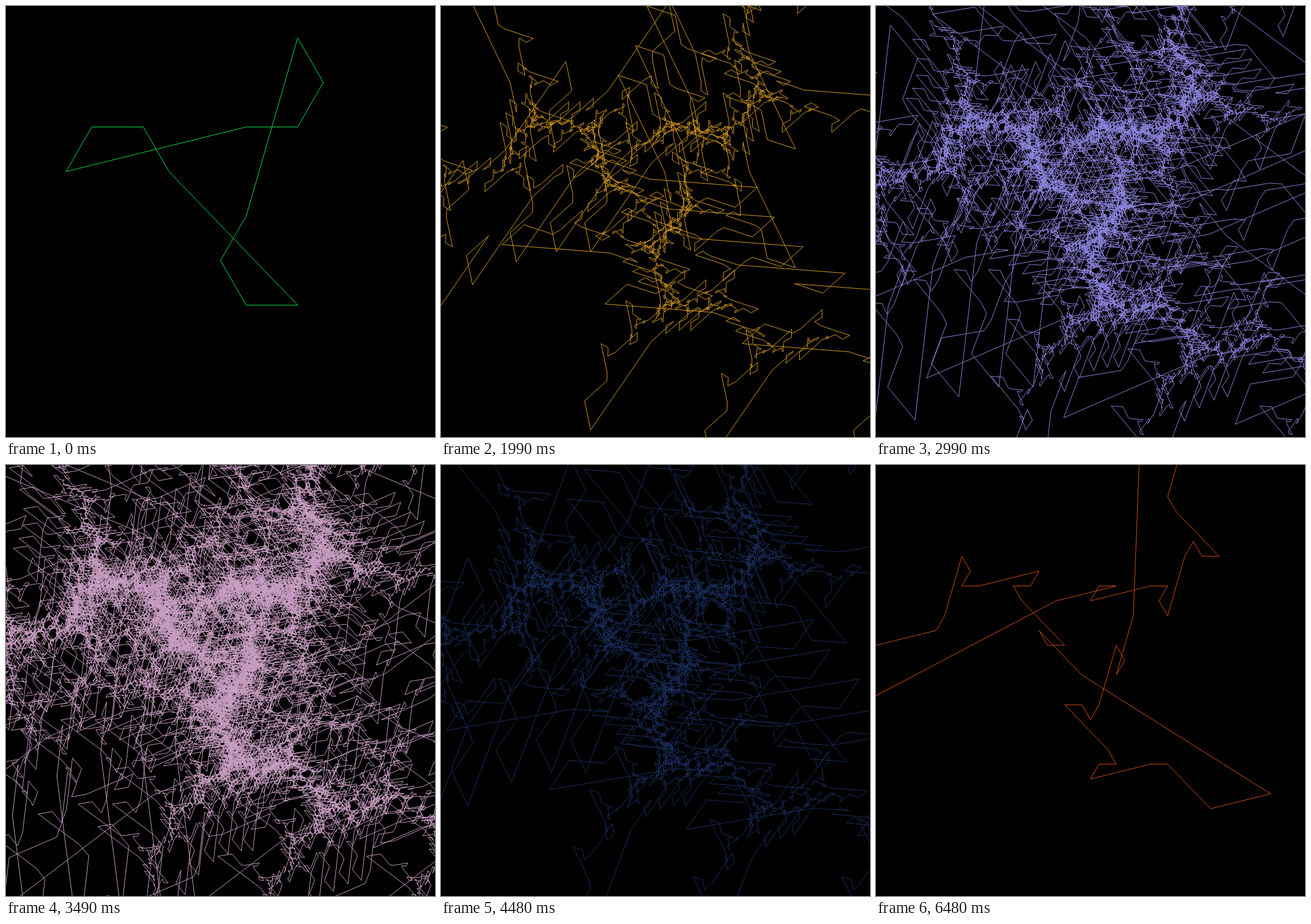
Animation of 746 by 750 pixels, one loop 6.98 s. Source, as an HTML page with a canvas:

```html
<!DOCTYPE html>
<html lang="en">
<head>
<meta charset="utf-8">
<title>Skewed snowflake</title>
<style>
  html, body { margin: 0; width: 100%; height: 100%; overflow: hidden; background: #000; }
  canvas { display: block; }
</style>
</head>
<body>
<canvas id="stage" width="746" height="750"></canvas>
<script>
const W = 746, H = 750, LOOP = 6980;
const CENTER = [372.9, 288], RADIUS = 155;
const COS = 0.5, SIN = Math.sqrt(3) / 2;
const CHUNK = 2048;

// start in ms, recursion level, line colour
const STEPS = [
  [0, 1, '#00ea50'],
  [490, 2, '#2fb4d6'],
  [990, 3, '#c8d23c'],
  [1490, 4, '#d0488c'],
  [1990, 5, '#dc9f1e'],
  [2490, 6, '#4fae78'],
  [2990, 7, '#9085e0'],
  [3490, 8, '#c99fc3'],
  [3980, 7, '#7a8c9c'],
  [4480, 6, '#1b2f60'],
  [4980, 5, '#7c5cc0'],
  [5480, 4, '#dc17a4'],
  [5980, 3, '#58a848'],
  [6480, 2, '#dc500a']
];

function triangle() {
  const pts = [];
  for (const deg of [-30, 210, 90, -30]) {
    const a = deg * Math.PI / 180;
    pts.push(CENTER[0] + RADIUS * Math.cos(a), CENTER[1] + RADIUS * Math.sin(a));
  }
  return pts;
}

// Koch-like rule whose second corner overshoots the end of the edge
function refine(pts) {
  const edges = pts.length / 2 - 1;
  const out = new Float64Array((edges * 4 + 1) * 2);
  let n = 0;
  const add = (x, y) => { out[n++] = x; out[n++] = y; };
  for (let i = 0; i < edges; i++) {
    const ax = pts[2 * i], ay = pts[2 * i + 1];
    const bx = pts[2 * i + 2], by = pts[2 * i + 3];
    const dx = (bx - ax) / 3, dy = (by - ay) / 3;
    add(ax, ay);
    add(ax + dx, ay + dy);
    add(bx + dx + dx * COS + dy * SIN, by + dy - dx * SIN + dy * COS);
    add(bx + dx, by + dy);
  }
  add(pts[pts.length - 2], pts[pts.length - 1]);
  return out;
}

function render(pts, color) {
  const layer = document.createElement('canvas');
  layer.width = W;
  layer.height = H;
  const c = layer.getContext('2d');
  c.fillStyle = '#000';
  c.fillRect(0, 0, W, H);
  c.strokeStyle = color;
  c.lineWidth = 1;
  const last = pts.length / 2 - 1;
  for (let start = 0; start < last; start += CHUNK) {
    const end = Math.min(start + CHUNK, last);
    c.beginPath();
    c.moveTo(pts[2 * start], pts[2 * start + 1]);
    for (let i = start + 1; i <= end; i++) c.lineTo(pts[2 * i], pts[2 * i + 1]);
    if (end === last && start === 0) c.closePath();
    c.stroke();
  }
  return layer;
}

const levels = [triangle()];
for (let i = 1; i <= 8; i++) levels.push(refine(levels[i - 1]));
const layers = STEPS.map(([, level, color]) => render(levels[level], color));

const ctx = document.getElementById('stage').getContext('2d');
let shown = -1;

function show(t) {
  let k = STEPS.length - 1;
  while (STEPS[k][0] > t) k--;
  if (k === shown) return;
  shown = k;
  ctx.drawImage(layers[k], 0, 0);
}

show(0);
const t0 = performance.now();
function tick() {
  show((performance.now() - t0) % LOOP);
  requestAnimationFrame(tick);
}
requestAnimationFrame(tick);
</script>
</body>
</html>
```
